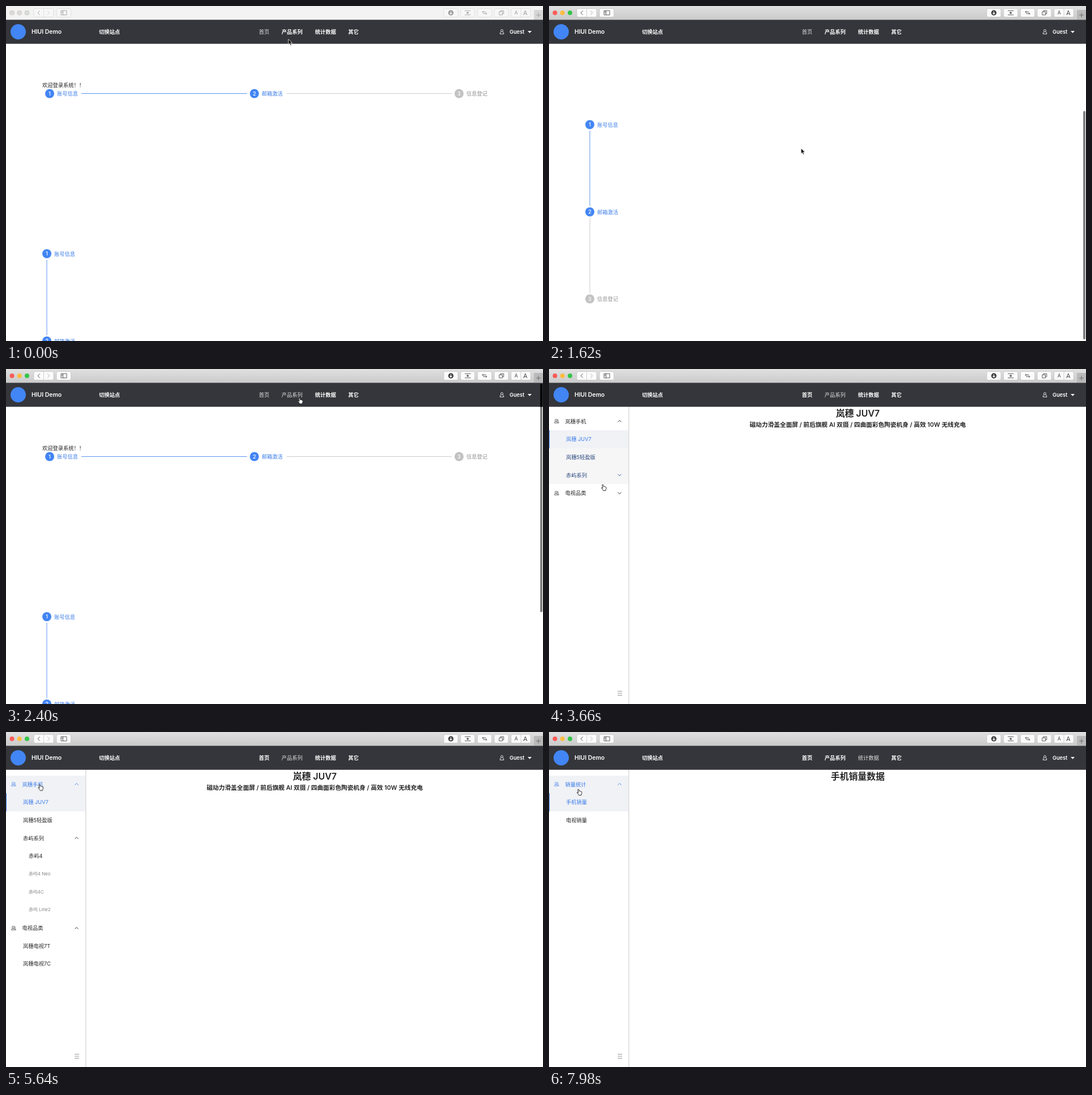
An HTML page for the animation above (8000 ms loop, 947x591 px).

```html
<!DOCTYPE html>
<html lang="zh-CN">
<head>
<meta charset="utf-8">
<title>HIUI Demo</title>
<style>
:root { --blue: #4285f4; --link: #3b7ce8; --ink: #242424; --tint: #f0f2f6; --row: 31.67px; }
html, body { margin: 0; width: 100%; height: 100%; overflow: hidden; background: #fff; }
body { position: relative; font: 9.24px/14px Inter, "Noto Sans CJK SC", "Noto Sans CJK", sans-serif; color: var(--ink); }
body * { animation-duration: 8s; animation-timing-function: linear; animation-iteration-count: infinite; }
.abs, .page, .bar, .cursor, header, header > * { position: absolute; white-space: nowrap; }
svg { overflow: visible; }

/* window bar */
.bar { left: 0; top: 0; width: 947px; height: 25px; }
.bar .btn { fill: #fbfbfb; stroke: #c4c4c4; stroke-width: .8; }
.bar .line { fill: none; stroke: #4a4a4a; stroke-width: .9; }
.bar text { fill: #444; text-anchor: middle; }
.idle { animation-name: blur; animation-timing-function: step-end; }
.glyphs { animation-name: wake; animation-timing-function: step-end; }
@keyframes blur { 0% { opacity: 1 } 10.5%, 100% { opacity: 0 } }
@keyframes wake { 0% { opacity: .5 } 10.5%, 100% { opacity: 1 } }

/* header */
header { left: 0; top: 24px; width: 947px; height: 43px; overflow: hidden; color: #fff; font-weight: 600;
  background: linear-gradient(#6d6e71 1px, #34363b 1px 42px, #77787c 42px); }
header > span { top: 14.5px; }
header .brand { left: 45px; font-size: 10.4px; }
.logo { left: 8px; top: 8px; width: 27px; height: 27px; border-radius: 50%; background: var(--blue); }
.nav { animation-timing-function: step-end; }
.n1 { left: 446px; animation-name: nav-home; }
.n2 { left: 486px; animation-name: nav-goods; }
.n3 { left: 545px; animation-name: nav-stats; }
@keyframes nav-home { 0% { font-weight: 400; color: #e0e0e0 } 31.5%, 100% { font-weight: 600; color: #fff } }
@keyframes nav-goods { 29% { font-weight: 400; color: #e0e0e0 } 94.5%, 100% { font-weight: 600; color: #fff } }
@keyframes nav-stats { 84%, 100% { font-weight: 400; color: #e0e0e0 } }

/* pages */
.page { left: 0; top: 0; width: 947px; height: 591px; overflow: hidden; animation-timing-function: step-end; }
.home { animation-name: home; }
.goods { animation-name: goods; }
.stats { animation-name: stats; }
@keyframes home { 0% { visibility: visible } 31.5%, 100% { visibility: hidden } }
@keyframes goods { 0% { visibility: hidden } 31.5% { visibility: visible } 94.5%, 100% { visibility: hidden } }
@keyframes stats { 0% { visibility: hidden } 94.5%, 100% { visibility: visible } }

.scroll { animation-name: scroll; }
@keyframes scroll {
  0%, 13.5% { transform: none }
  14.25% { transform: translateY(-70px) }
  15.75% { transform: translateY(-165px) }
  18%, 20.25% { transform: translateY(-229px) }
  21.75% { transform: translateY(-80px) }
  22.75% { transform: none }
  23.25% { transform: translateY(11px) }
  24% { transform: translateY(8.5px) }
  26.25%, 100% { transform: none }
}
.thumb { position: absolute; left: 941.5px; width: 4.5px; height: 403px; border-radius: 3px; animation-name: thumb, flash; animation-timing-function: linear, step-end; }
.home .thumb { top: 26px; background: #7f7f7f; }
header .thumb { top: 2px; background: #060606; }
@keyframes thumb {
  0%, 13.5% { transform: none; height: 403px }
  14.25% { transform: translateY(50px) }
  15.75% { transform: translateY(116px) }
  18%, 20.25% { transform: translateY(160px) }
  21.75% { transform: translateY(56px) }
  22.75% { transform: none; height: 403px }
  24% { transform: none; height: 396px }
  26.25%, 100% { transform: none; height: 403px }
}
@keyframes flash { 0% { opacity: 0 } 14.25% { opacity: 1 } 32.25%, 100% { opacity: 0 } }

.home text { fill: #8f8f8f; }
.home .done text { fill: var(--link); }
.home circle { fill: #c2c2c2; }
.home .done circle { fill: var(--blue); }
.home .num, .home .done .num { fill: #fff; font-weight: 500; text-anchor: middle; }
.home path { stroke: #ccc; }
.home .done path { stroke: #5d96f2; }

/* side menu */
.side { left: 0; top: 67px; width: 140px; height: 524px; border-right: 1px solid #d9d9d9; box-shadow: 1px 0 1px #f0f0f0; }
.menu { position: absolute; left: 0; top: 9.67px; width: 140px; }
.row { position: relative; height: var(--row); line-height: var(--row); padding-left: 28.5px; background: #fff; }
.sub { padding-left: 30px; }
.leaf { padding-left: 40px; }
.small { font-size: 7.92px; color: #858585; }
.active { color: var(--link); background: linear-gradient(90deg, #3a78e6 1.3px, var(--tint) 1.3px); }
.row svg { position: absolute; fill: none; stroke: currentColor; }
.row .who { left: 9px; top: 11.8px; width: 9px; height: 8px; stroke-width: .7; }
.row .chev { left: 121px; top: 13.8px; width: 7px; height: 4px; stroke-width: .9; }
.fold { overflow: hidden; height: 0; }
.fold.reds { animation-name: open-reds; }
.fold.tvs { animation-name: open-tvs; }
.reds-chev { animation-name: flip-reds; }
.tvs-chev { animation-name: flip-tvs; }
@keyframes open-reds { 0%, 48.75% { height: 0; animation-timing-function: ease } 52.5%, 100% { height: 126.67px } }
@keyframes open-tvs { 0%, 57.75% { height: 0; animation-timing-function: ease } 61.5%, 100% { height: 63.33px } }
@keyframes flip-reds { 0%, 48.75% { transform: rotate(180deg) } 52.5%, 100% { transform: none } }
@keyframes flip-tvs { 0%, 57.75% { transform: rotate(180deg) } 61.5%, 100% { transform: none } }

/* pointer hover on menu rows */
.h-phone { animation-name: h-phone; }
.h-lite { animation-name: h-lite; }
.h-reds { animation-name: h-reds; }
.h-tvs { animation-name: h-tvs; }
.h-tv { animation-name: h-tv; }
.h-sales { animation-name: h-sales; }
@keyframes h-phone {
  0%, 65.5%, 77.5%, 100% { color: var(--ink); background: #fff }
  68%, 74% { color: var(--link); background: var(--tint) }
}
@keyframes h-lite {
  0%, 42.5%, 48%, 100% { color: var(--ink); background: #fff }
  44.25% { color: var(--link); background: var(--tint) }
  45.75% { color: #2a477c; background: #f6f6f7 }
}
@keyframes h-reds {
  0%, 44%, 56%, 100% { color: var(--ink); background: #fff }
  45.75% { color: #2a477c; background: #f6f6f7 }
  47.5%, 52.5% { color: var(--link); background: var(--tint) }
}
@keyframes h-tvs {
  0%, 54.75%, 63.5%, 75.25%, 79.5%, 100% { color: var(--ink); background: #fff }
  57.5%, 60%, 76.75% { color: var(--link); background: var(--tint) }
}
@keyframes h-tv {
  0%, 60.5%, 67%, 100% { color: var(--ink); background: #fff }
  63%, 63.75% { color: var(--link); background: var(--tint) }
}
@keyframes h-sales {
  0%, 98% { color: var(--ink); background: #fff }
  99.5%, 100% { color: var(--link); background: var(--tint) }
}
.burger { left: 121px; top: 501px; width: 8px; height: 8px; stroke: #8a8a8a; stroke-width: .9; }
h1, h2 { position: absolute; left: 141px; width: 807px; margin: 0; text-align: center; font-weight: 600; white-space: nowrap; }
h1 { top: 69px; font-size: 15.84px; line-height: 20px; }
h2 { top: 91px; font-size: 10.66px; line-height: 15px; }

/* pointer */
.cursor { left: 0; top: 0; width: 12px; height: 14px; animation-name: move; }
.arrow { animation-name: arrow; animation-timing-function: step-end; }
.hand { animation-name: hand; animation-timing-function: step-end; }
@keyframes arrow {
  0%, 33.5%, 79%, 95.75% { opacity: 1 }
  29%, 40%, 82.5%, 98.25%, 100% { opacity: 0 }
}
@keyframes hand {
  0%, 33.5%, 79%, 95.75% { opacity: 0 }
  29%, 40%, 82.5%, 98.25%, 100% { opacity: 1 }
}
@keyframes move {
  0%, 1.5% { transform: translate(498px, 58.5px) }
  3%, 6% { transform: translate(444px, 118px) }
  9.5%, 26.25% { transform: translate(444.5px, 251px); animation-timing-function: ease-in-out }
  29.5%, 33% { transform: translate(517.5px, 51px); animation-timing-function: ease-in }
  36% { transform: translate(350px, 72px) }
  40% { transform: translate(92px, 112px) }
  42.5% { transform: translate(92px, 140px) }
  45.75% { transform: translate(95px, 204px) }
  48%, 52.5% { transform: translate(98px, 184px); animation-timing-function: ease-in-out }
  56%, 59.25% { transform: translate(95px, 340px); animation-timing-function: ease-in-out }
  61.5%, 63% { transform: translate(88px, 374px); animation-timing-function: ease-in-out }
  66.25% { transform: translate(62px, 99px) }
  70.5%, 73.5% { transform: translate(59.5px, 92.5px); animation-timing-function: ease-in-out }
  76.5% { transform: translate(70px, 350px); animation-timing-function: ease-in }
  79% { transform: translate(170px, 240px); animation-timing-function: ease-out }
  83.25%, 88.5% { transform: translate(563px, 47px) }
  89.25%, 94.5% { transform: translate(563px, 46px); animation-timing-function: ease-in-out }
  99.6%, 100% { transform: translate(52px, 101px) }
}
</style>
</head>
<body>

<svg width="0" height="0" style="position:absolute">
  <defs>
    <linearGradient id="steel" x2="0" y2="1"><stop stop-color="#e0e0e0"/><stop offset="1" stop-color="#cacaca"/></linearGradient>
    <g id="who"><circle cx="3.4" cy="2.3" r="1.8"/><path d="M.5 7.2V6.6Q.7 4.6 3.4 4.6T6.3 6.6V7.2ZM5.6.7A1.7 1.7 0 0 1 6 4Q8.2 4.5 8.2 7.2H6.6"/></g>
    <path id="chev" d="M.5 3.5L3.5.5 6.5 3.5"/>
    <path id="burger" d="M0 .5H8M0 4H8M0 7.5H8"/>
  </defs>
</svg>

<main class="page home">
  <svg class="abs scroll" width="947" height="820">
    <text x="64" y="143.3" style="fill:#222">欢迎登录系统！！</text>
    <g class="done">
      <circle cx="77" cy="154.5" r="8"/><text class="num" x="77" y="157.8">1</text>
      <text x="90" y="158.2">账号信息</text><path d="M133 154.5H425"/>
      <circle cx="438" cy="154.5" r="8"/><text class="num" x="438" y="157.8">2</text>
      <text x="451" y="158.2">邮箱激活</text>
      <circle cx="72" cy="437" r="8"/><text class="num" x="72" y="440.3">1</text>
      <text x="85" y="440.5">账号信息</text><path d="M72 447.5V580.5"/>
      <circle cx="72" cy="591" r="8"/><text class="num" x="72" y="594.3">2</text>
      <text x="85" y="594.5">邮箱激活</text>
    </g>
    <path d="M495 154.5H786M72 601.5V734"/>
    <circle cx="799" cy="154.5" r="8"/><text class="num" x="799" y="157.8">3</text>
    <text x="812" y="158.2">信息登记</text>
    <circle cx="72" cy="744.5" r="8"/><text class="num" x="72" y="747.8">3</text>
    <text x="85" y="748">信息登记</text>
  </svg>
  <div class="thumb"></div>
</main>

<main class="page goods">
  <div class="abs side">
    <div class="menu">
      <div class="row h-phone"><svg class="who"><use href="#who"/></svg>岚穗手机<svg class="chev"><use href="#chev"/></svg></div>
      <div class="row sub active">岚穗 JUV7</div>
      <div class="row sub h-lite">岚穗5轻盈版</div>
      <div class="row sub h-reds">赤屿系列<svg class="chev reds-chev"><use href="#chev"/></svg></div>
      <div class="fold reds">
        <div class="row leaf">赤屿4</div>
        <div class="row leaf small">赤屿4 Neo</div>
        <div class="row leaf small">赤屿4C</div>
        <div class="row leaf small">赤屿 Line2</div>
      </div>
      <div class="row h-tvs"><svg class="who"><use href="#who"/></svg>电视品类<svg class="chev tvs-chev"><use href="#chev"/></svg></div>
      <div class="fold tvs">
        <div class="row sub h-tv">岚穗电视7T</div>
        <div class="row sub">岚穗电视7C</div>
      </div>
    </div>
    <svg class="abs burger"><use href="#burger"/></svg>
  </div>
  <h1>岚穗 JUV7</h1>
  <h2>磁动力滑盖全面屏 / 前后旗舰 AI 双摄 / 四曲面彩色陶瓷机身 / 高效 10W 无线充电</h2>
</main>

<main class="page stats">
  <div class="abs side">
    <div class="menu">
      <div class="row h-sales"><svg class="who"><use href="#who"/></svg>销量统计<svg class="chev"><use href="#chev"/></svg></div>
      <div class="row sub active">手机销量</div>
      <div class="row sub">电视销量</div>
    </div>
    <svg class="abs burger"><use href="#burger"/></svg>
  </div>
  <h1>手机销量数据</h1>
</main>

<svg class="bar">
  <rect width="947" height="24.5" fill="url(#steel)"/>
  <rect class="idle" width="947" height="24.5" fill="#f3f3f3"/>
  <circle cx="10.5" cy="12" r="4" fill="#fc5b57"/>
  <circle cx="23.7" cy="12" r="4" fill="#fdbc40"/>
  <circle cx="37" cy="12" r="4" fill="#34c648"/>
  <g class="idle" fill="#dadada" stroke="#cbcbcb" stroke-width=".6">
    <circle cx="10.5" cy="12" r="4"/><circle cx="23.7" cy="12" r="4"/><circle cx="37" cy="12" r="4"/>
  </g>
  <rect x="931" y="7" width="16" height="17.5" fill="#b9b9b9"/>
  <rect class="idle" x="931" y="7" width="16" height="17.5" fill="#d6d6d6"/>
  <g class="glyphs">
    <g class="btn">
      <rect x="49" y="4.5" width="35" height="15" rx="2.5"/><path d="M66.5 4.5V19.5"/>
      <rect x="89" y="4.5" width="25.5" height="15" rx="2.5"/>
      <rect x="772" y="4.5" width="25" height="15" rx="2.5"/>
      <rect x="801.7" y="4.5" width="25" height="15" rx="2.5"/>
      <rect x="831.5" y="4.5" width="25" height="15" rx="2.5"/>
      <rect x="861" y="4.5" width="25" height="15" rx="2.5"/>
      <rect x="890.7" y="4.5" width="34.5" height="15" rx="2.5"/><path d="M908 4.5V19.5"/>
    </g>
    <g class="line">
      <path d="M59.7 8.3L56 12 59.7 15.7"/>
      <path d="M73 8.3L76.7 12 73 15.7" stroke="#aaa"/>
      <path d="M97 8.2H107V15.8H97ZM100.5 8.2V15.8M98 10.2H99.5M98 12H99.5"/>
      <path d="M809 8.3H819.5M809 15.7H819.5"/>
      <path d="M846.5 10.5H840M841.8 8.7L840 10.5 841.8 12.3M841.5 13.5H848M846.2 11.7L848 13.5 846.2 15.3"/>
      <path d="M869.8 10.2H875.5V15.8H869.8ZM872 10V8.2H877.7V13.7H875.7"/>
      <path d="M939 12V20M935 16H943" stroke="#666"/>
    </g>
    <circle cx="784.5" cy="12" r="4.7" fill="#444"/>
    <path d="M784.5 9.3V14M782.5 12.3L784.5 14.4 786.5 12.3" fill="none" stroke="#fff" stroke-width="1.1"/>
    <path d="M814.2 9.6L814.9 11.3H816.8L815.3 12.5 815.9 14.3 814.2 13.2 812.5 14.3 813.1 12.5 811.6 11.3H813.5Z" fill="#444"/>
    <text x="899.7" y="15" font-size="8.5">A</text>
    <text x="915.7" y="16" font-size="11">A</text>
  </g>
</svg>

<header>
  <div class="logo"></div>
  <span class="brand">HIUI Demo</span>
  <span style="left:164px">切换站点</span>
  <span class="nav n1">首页</span>
  <span class="nav n2">产品系列</span>
  <span class="nav n3">统计数据</span>
  <span style="left:603.5px">其它</span>
  <svg style="left:870px;top:17px" width="9" height="9" fill="none" stroke="#fff" stroke-width=".9">
    <circle cx="4.5" cy="2.6" r="2"/><path d="M2.9 4.4Q1.2 5.4 1.2 8.3H7.8Q7.8 5.4 6.1 4.4"/>
  </svg>
  <span style="left:888px">Guest</span>
  <svg style="left:919.5px;top:19.5px" width="7" height="4"><path d="M0 0H7L3.5 3.7Z" fill="#fff"/></svg>
  <div class="thumb"></div>
</header>

<svg class="cursor">
  <path class="arrow" d="M0 0V9.6L2.2 7.5 3.8 11.2 5.5 10.4 3.9 6.9H6.9Z" fill="#000" stroke="#fff" stroke-width=".8"/>
  <path class="hand" d="M-1.3 1Q-1.2 -.1 -.3 0 .5 .1 .8 1.2L1.4 3.4Q2.4 2.7 3 3.7 4 3.1 4.5 4.1 5.8 3.8 5.9 5.4 6.1 7.6 4.9 9V10.6H.6Q.2 9.2 -1 8 -3.2 6 -2.6 5.5 -1.9 4.9 -.2 6.3Z" fill="#fff" stroke="#111" stroke-width=".9" stroke-linejoin="round"/>
</svg>

</body>
</html>
```
